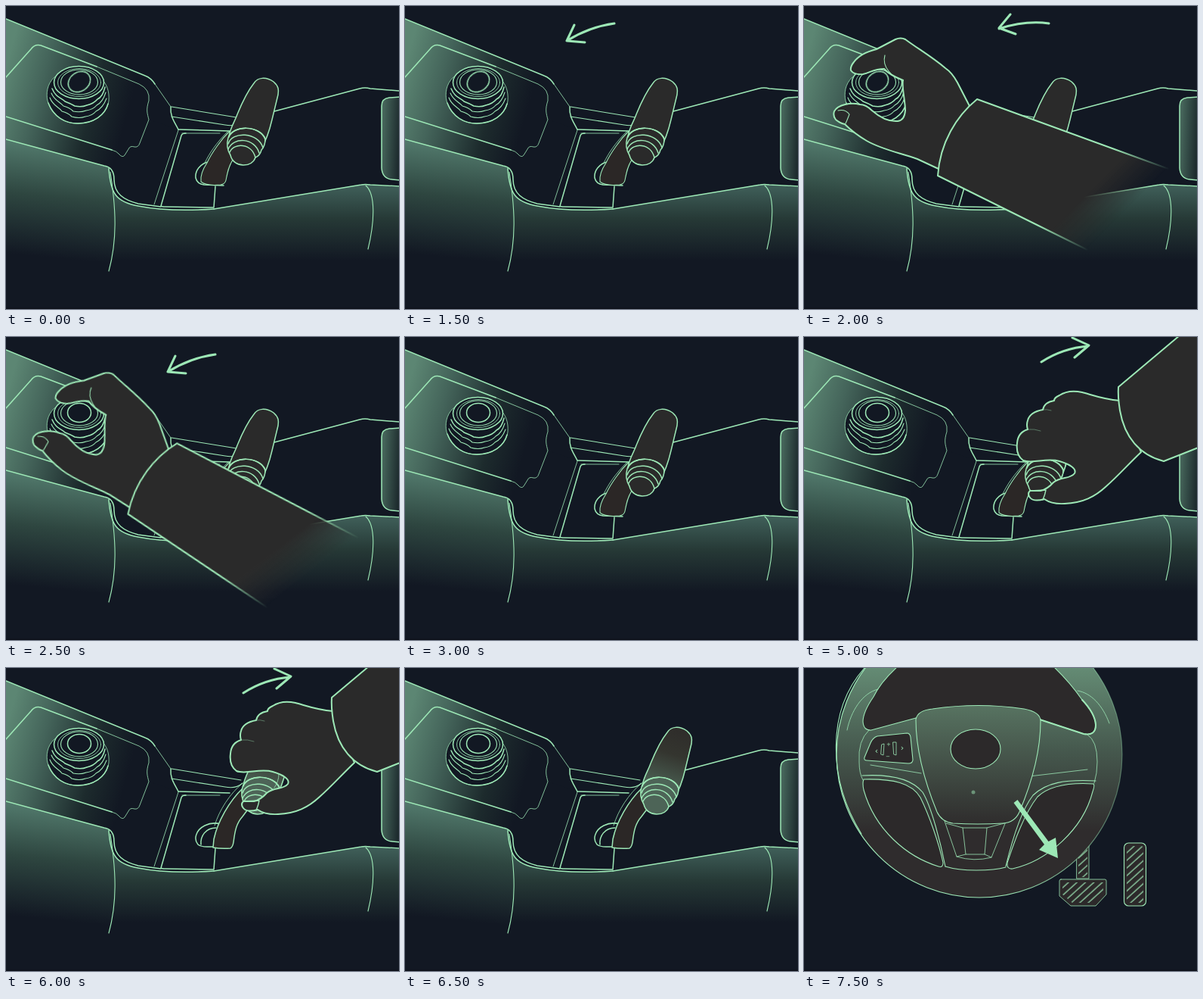
Write an HTML page that moves like this. It is 520 by 400 pixels and loops after 8 s.

```html
<!DOCTYPE html>
<html lang="en">
<head>
<meta charset="utf-8">
<title>Gear console and knob</title>
<style>
html, body { margin: 0; width: 100%; height: 100%; overflow: hidden; background: #121823; }
svg { display: block; width: 520px; height: 400px; }
.line { fill: none; stroke: #9de8b6; stroke-width: 1.5; stroke-linejoin: round; stroke-linecap: round; }
.fine { stroke-width: 1.1; }
.thin { stroke-width: .8; }
.bold { stroke-width: 2; }
.arrow { stroke-width: 3; }
.dark { fill: #2a2a2a; }
.night { fill: #121823; }
.hub { fill: #2c292a; }

/* Every change is a hard cut; 6.25% is half a second. */
.cut { animation: 8s step-end infinite; }
.scene { animation-name: scene; }
.wheel { animation-name: wheel; opacity: 0; }
.left1 { animation-name: left1; opacity: 0; }
.left2 { animation-name: left2; opacity: 0; }
.right1 { animation-name: right1; opacity: 0; }
.right2 { animation-name: right2; opacity: 0; }
.turnHand { animation-name: turnHand; opacity: 0; transform-origin: 95px 110px; }
.pullHand { animation-name: pullHand; opacity: 0; }
.cap { animation-name: cap; transform-origin: 97px 100px; }
.rest { animation-name: rest; }
.raised { animation-name: raised; opacity: 0; }

@keyframes scene { 0% { opacity: 1 } 93.75%, 100% { opacity: 0 } }
@keyframes wheel { 0% { opacity: 0 } 93.75%, 100% { opacity: 1 } }
@keyframes left1 { 0% { opacity: 0 } 12.5% { opacity: 1 } 18.75% { opacity: 0 } 25% { opacity: 1 } 31.25%, 100% { opacity: 0 } }
@keyframes left2 { 0% { opacity: 0 } 18.75% { opacity: 1 } 25% { opacity: 0 } 31.25% { opacity: 1 } 37.5%, 100% { opacity: 0 } }
@keyframes right1 { 0% { opacity: 0 } 56.25% { opacity: 1 } 62.5% { opacity: 0 } 68.75% { opacity: 1 } 75%, 100% { opacity: 0 } }
@keyframes right2 { 0% { opacity: 0 } 62.5% { opacity: 1 } 68.75% { opacity: 0 } 75% { opacity: 1 } 81.25%, 100% { opacity: 0 } }
@keyframes turnHand {
  0% { opacity: 0; transform: none }
  25% { opacity: 1; transform: none }
  31.25% { opacity: 1; transform: rotate(7.5deg) }
  37.5%, 100% { opacity: 0; transform: none }
}
@keyframes pullHand {
  0% { opacity: 0; transform: none }
  50% { opacity: 1; transform: none }
  75% { opacity: 1; transform: translate(15px, -27px) }
  81.25%, 100% { opacity: 0; transform: none }
}
@keyframes cap { 0% { transform: rotate(-35deg) } 31.25%, 100% { transform: none } }
@keyframes rest { 0% { opacity: 1 } 75%, 100% { opacity: 0 } }
@keyframes raised { 0% { opacity: 0 } 75%, 100% { opacity: 1 } }
</style>
</head>
<body>
<svg viewBox="0 0 520 400">
<defs>
  <linearGradient id="dash" gradientUnits="userSpaceOnUse" x1="0" y1="80" x2="165" y2="126">
    <stop stop-color="#5c8673"/><stop offset=".3" stop-color="#44645a"/><stop offset=".72" stop-color="#1d2b2d"/><stop offset="1" stop-color="#121823"/>
  </linearGradient>
  <linearGradient id="side" gradientUnits="userSpaceOnUse" x1="0" y1="180" x2="-14" y2="325">
    <stop stop-color="#50776a"/><stop offset=".45" stop-color="#2e4640"/><stop offset="1" stop-color="#121823"/>
  </linearGradient>
  <linearGradient id="base" gradientUnits="userSpaceOnUse" x1="0" y1="236" x2="0" y2="336">
    <stop stop-color="#40605a"/><stop offset=".45" stop-color="#263936"/><stop offset="1" stop-color="#121823"/>
  </linearGradient>
  <linearGradient id="pocket" x1="0" y1="0" x2="1" y2=".2">
    <stop stop-color="#4c6e61"/><stop offset="1" stop-color="#1d2b2e"/>
  </linearGradient>
  <linearGradient id="sleeve" gradientUnits="userSpaceOnUse" x1="392" y1="231" x2="428" y2="267">
    <stop stop-color="#2a2a2a"/><stop offset="1" stop-color="#2a2a2a" stop-opacity="0"/>
  </linearGradient>
  <linearGradient id="hem" gradientUnits="userSpaceOnUse" x1="380" y1="219" x2="430" y2="269">
    <stop stop-color="#9de8b6"/><stop offset="1" stop-color="#9de8b6" stop-opacity="0"/>
  </linearGradient>
  <linearGradient id="handle" gradientUnits="userSpaceOnUse" x1="355" y1="85" x2="325" y2="180">
    <stop stop-color="#2c2928"/><stop offset=".5" stop-color="#34352f"/><stop offset="1" stop-color="#4d6457"/>
  </linearGradient>
  <linearGradient id="rim" gradientUnits="userSpaceOnUse" x1="0" y1="0" x2="0" y2="215">
    <stop stop-color="#648b74"/><stop offset=".5" stop-color="#46594e"/><stop offset="1" stop-color="#2f2c2d"/>
  </linearGradient>
  <linearGradient id="pad" gradientUnits="userSpaceOnUse" x1="0" y1="50" x2="0" y2="205">
    <stop stop-color="#577361"/><stop offset="1" stop-color="#2f2d2d"/>
  </linearGradient>
  <linearGradient id="edge" x1="0" y1="0" x2="1" y2="0">
    <stop stop-color="#9de8b6"/><stop offset=".6" stop-color="#9de8b6"/><stop offset="1" stop-color="#9de8b6" stop-opacity=".35"/>
  </linearGradient>
  <pattern id="hatch" width="7.500" height="8" patternUnits="userSpaceOnUse" patternTransform="rotate(48)">
    <path d="M2 0V8" stroke="#9de8b6" stroke-width="1.2"/>
  </pattern>
  <path id="grip" d="M295 172C297 160 303 152 306 143C313 126 320 112 328 102C333 94 344 93 354 100C361 106 361 111 360 117L352 150C349 163 344 178 337 190Z"/>
  <path id="knobBody" d="M294 174C291 184 294 192 297 197C299 206 307 210 314 210C322 210 328 206 330 200C335 198 337 194 338 190C342 186 343 180 343 175C336 158 300 156 294 174Z"/>
  <path id="knobRings" d="M295 173C301 157 336 157 343 176M294 182C299 165 333 166 340 187M294 189C301 172 329 174 335 194M296 193C302 180 325 181 330 200"/>
</defs>

<g class="cut scene">
  <path fill="url(#dash)" d="M0 17L184 92Q192 95 197 103L218 133L228 163L200 250L140 214L0 176Z"/>
  <path class="night" d="M137 214L150 196L176 184L190 150L228 163L205 264L160 256L143 236Z"/>
  <path fill="url(#side)" d="M0 176L130 211Q137 213 137 218C147 270 148 310 136 350H0Z"/>
  <path fill="url(#base)" d="M138 219C140 250 148 259 175 264C205 270 245 270 275 268L470 236Q479 235 487 237L520 239V345H137C146 305 145 260 138 219Z"/>

  <g class="line">
    <path d="M0 17L184 92Q192 95 197 103"/>
    <path class="thin" d="M197 103L218 133"/>
    <path d="M218 133C217 146 223 153 228 163"/>
    <path d="M0 94L33 57Q38 50 46 52L120 80"/>
    <path class="thin" d="M120 80L176 103Q191 110 189 125C185 137 187 142 189 150L177 181Q175 187 170 186Q164 184 162 189L157 197Q154 201 149 195Q147 192 140 190"/>
    <path d="M0 146L140 190"/>
    <path d="M0 176L130 211Q143 213 143 229C143 248 156 256 175 261L205 265"/>
    <path d="M136 214C138 249 147 259 175 264C205 270 245 270 275 268"/>
    <path class="fine" d="M138 219C146 270 147 310 136 350"/>
    <path d="M275 268L470 236Q475 235 482 236L520 238"/>
    <path class="fine" d="M476 237C489 248 488 284 479 321"/>
    <path d="M340 143L468 109Q475 107 482 109L520 112"/>
    <path class="fine" d="M219 133L311 148"/>
    <path class="fine" d="M219 146L290 157Q304 160 313 152"/>
    <path d="M228 163L296 165"/>
    <path class="thin" d="M228 164L196 262M233 168L283 168"/>
    <path d="M205 264L232 171Q233 168 238 168M205 264Q206 265 211 265L275 266L277 238"/>
    <path fill="url(#pocket)" d="M522 120L507 121Q497 122 497 132V214Q498 228 511 229L522 230"/>
  </g>

  <g class="line">
    <path class="night thin" d="M64 94C54 103 53 116 55 125C60 144 75 155 95 155C118 155 134 142 136 125C137 112 133 103 127 97Z"/>
    <path d="M56 128C63 146 78 155 95 155C116 155 131 144 135 129"/>
    <path class="fine" d="M58 121C62 132 70 133 74 139Q82 141 87 146Q97 149 105 146Q114 145 119 139Q128 135 133 122"/>
    <path class="fine" d="M60 115C64 125 71 126 76 132Q84 134 89 139Q98 141 106 138Q115 137 120 131Q128 127 132 114"/>
    <path d="M61 109C66 121 73 121 78 126Q86 129 91 132Q100 134 107 131Q116 129 121 123Q128 120 131 107"/>
    <ellipse class="night" cx="96.500" cy="101" rx="33" ry="21.500"/>
    <ellipse class="thin" cx="97" cy="101" rx="28.500" ry="18.500"/>
    <ellipse class="fine" cx="97" cy="100.500" rx="24.500" ry="16.500"/>
    <ellipse class="cut cap" cx="97" cy="100" rx="15.500" ry="12.500"/>
  </g>

  <g class="line cut rest">
    <path class="night" d="M270 205C256 208 250 218 251 227Q253 235 262 236L288 237"/>
    <path class="fine" fill="#2b2726" d="M296 165C285 176 272 194 266 207C260 216 257 225 258 232Q266 238 284 236Q290 235 291 230C293 220 294 213 300 203Z"/>
    <path class="thin" d="M294 165C277 182 269 195 263 207"/>
    <use href="#grip" class="dark"/>
    <use href="#knobBody" class="dark"/>
    <use href="#knobRings"/>
  </g>

  <g class="line cut raised">
    <path class="night" d="M284 206Q273 203 263 208C251 214 248 226 254 233Q258 236 266 236H276"/>
    <path d="M278 211C264 211 257 222 258 233"/>
    <path fill="#2b2726" d="M314 158C295 176 280 203 275 226L274 237Q285 239 297 238Q300 236 301 230C303 214 305 205 313 196L322 184Z"/>
    <path class="thin" d="M313 152C296 166 282 188 276 208"/>
    <use href="#grip" x="19" y="-17" fill="url(#handle)"/>
    <use href="#knobBody" x="19" y="-17" fill="#4d6457"/>
    <use href="#knobRings" x="19" y="-17"/>
  </g>

  <g class="line cut turnHand">
    <path class="dark bold" d="M219 132L203 101Q196 88 187 82C168 66 150 56 134 44Q128 41 121 44L96 57C80 61 71 67 66 74Q61 80 62 85Q66 91 78 90C88 88 92 83 106 83Q113 91 131 98C129 107 134 125 134 138Q133 151 124 152C111 153 98 145 90 138Q82 130 74 130C62 127 45 130 40 139Q38 145 42 150Q48 155 54 156Q66 168 83 178C104 190 128 194 150 202L178 215Z"/>
    <path class="fine" d="M107 65Q104 76 112 86Q119 95 131 98M55 155Q57 151 60 143Q55 136 45 138"/>
    <path fill="url(#sleeve)" stroke="none" d="M229 123C202 145 180 180 177 224L375 322L485 216Z"/>
    <path class="bold" stroke="url(#hem)" d="M485 216L229 123C202 145 180 180 177 224L375 322"/>
  </g>

  <g class="line cut pullHand">
    <path class="dark bold" d="M418 84C394 82 380 76 368 73Q350 69 338 77Q331 80 331 84Q318 86 316 96Q299 99 296 110Q294 116 296 122Q283 126 282 140Q280 156 290 163C302 168 321 159 338 164C352 168 361 174 358 180C352 188 340 184 330 192Q322 201 313 203L299 203Q295 207 299 212Q304 218 318 214Q328 221 345 220C369 219 385 211 400 197C416 183 429 168 446 152Z"/>
    <path class="thin" opacity=".5" d="M296 122Q305 121 313 124M316 96Q321 95 327 97"/>
    <path d="M299 203L320 202Q319 208 316 215"/>
    <path class="thin" d="M346 167Q346 177 340 185"/>
    <path class="dark bold" d="M497 -2L416 66Q415 78 418 97C424 132 444 156 476 164L580 123V-2Z"/>
  </g>

  <g class="line arrow">
    <path class="cut left1" d="M324 23C302 20 280 23 258 30M273 11L258 29L280 37"/>
    <path class="cut left2" d="M277 23C255 26 235 33 214 46M224 25L214 46L238 48"/>
    <path class="cut right1" d="M270 62C284 48 303 37 329 34M306 23L329 34L316 51"/>
    <path class="cut right2" d="M314 33C331 22 351 14 376 12M355 1L377 11L358 27"/>
  </g>
</g>

<g class="cut wheel">
  <g class="line thin">
    <path class="hub" d="M361 230H377V278H361Z"/>
    <path fill="url(#hatch)" stroke="none" d="M363 234H375V276H363Z"/>
    <path class="hub" d="M340 279H398Q400 279 400 281V299L386 314H353L338 301V281Q338 279 340 279Z"/>
    <path fill="url(#hatch)" stroke="none" d="M342 283H396V297L384 310H355L342 299Z"/>
    <rect class="hub fine" x="423.500" y="231" width="29" height="83" rx="6"/>
    <rect fill="url(#hatch)" stroke="none" x="427" y="235" width="22" height="75" rx="3"/>
  </g>
  <circle cx="232" cy="114" r="189" fill="url(#rim)" stroke="url(#edge)" stroke-width="1.2"/>
  <g class="line fine">
    <path d="M80 0C30 56 31 146 76 219"/>
    <path class="hub" d="M124 -2Q101 19 92 38Q78 58 78 71Q79 83 89 82L148 66L312 68L370 87Q386 90 386 75Q385 60 368 42Q352 19 330 -2Z"/>
    <path class="bold" d="M312 68L370 87Q386 90 386 75Q385 60 368 42"/>
    <path class="thin" d="M57 82C62 57 77 33 98 28M404 73C395 49 380 33 362 30"/>
    <path class="thin" d="M86 82Q71 96 73 124Q73 139 78 148M375 88Q388 96 388 124Q388 139 384 152"/>
    <path class="thin" d="M88 128L155 139M298 143L375 134"/>
    <path class="hub" d="M80 118L88 99Q91 92 97 90L136 86Q140 86 141 91L144 121Q144 126 138 126L83 122Q79 122 80 118Z"/>
    <path class="thin" d="M103 101L106 100L105 115L102 114ZM118 98L122 98V115L119 114Z"/>
    <path d="M77 142C112 140 142 146 157 164C169 184 181 232 187 262M386 149C345 147 321 151 303 168C286 190 273 237 267 262"/>
    <path class="hub" d="M79 147C118 146 143 152 154 171C166 195 179 233 184 257Q184 264 178 262C136 249 94 214 79 161Q77 152 79 147Z"/>
    <path class="hub" d="M383 153C350 151 324 156 309 170C291 193 278 230 269 257Q268 266 276 265C321 255 369 214 382 163Q385 155 383 153Z"/>
    <path d="M187 262Q203 267 228 267Q253 267 267 263"/>
    <path class="thin" d="M186 202L202 249Q225 256 248 250L267 203M188 205L210 211H242L265 205M210 211L214 246H239L242 211M202 249L214 246M248 250L239 246"/>
    <path fill="url(#pad)" d="M148 68Q150 56 170 54Q231 45 291 54Q313 58 313 70C313 114 299 157 285 190Q279 204 263 205Q230 207 197 205Q182 203 176 190C160 151 148 111 148 68Z"/>
    <ellipse class="hub" cx="227" cy="107" rx="33" ry="26"/>
  </g>
  <circle cx="224" cy="164" r="2.500" fill="#9de8b6" opacity=".5"/>
  <g fill="#9de8b6" font-family="'DejaVu Sans', sans-serif" font-size="11" text-anchor="middle">
    <text x="96" y="113">‹</text><text x="130" y="109">›</text>
    <text x="112" y="103" font-size="7">+</text><text x="111" y="119" font-size="7">−</text>
  </g>
  <path d="M277.500 178L282.500 174L323.500 229L333 224L336 251L311 240L318 233Z" fill="#9de8b6"/>
</g>
<rect y="398.500" width="520" height="1.500" fill="#0d111a"/>
</svg>
</body>
</html>
```
